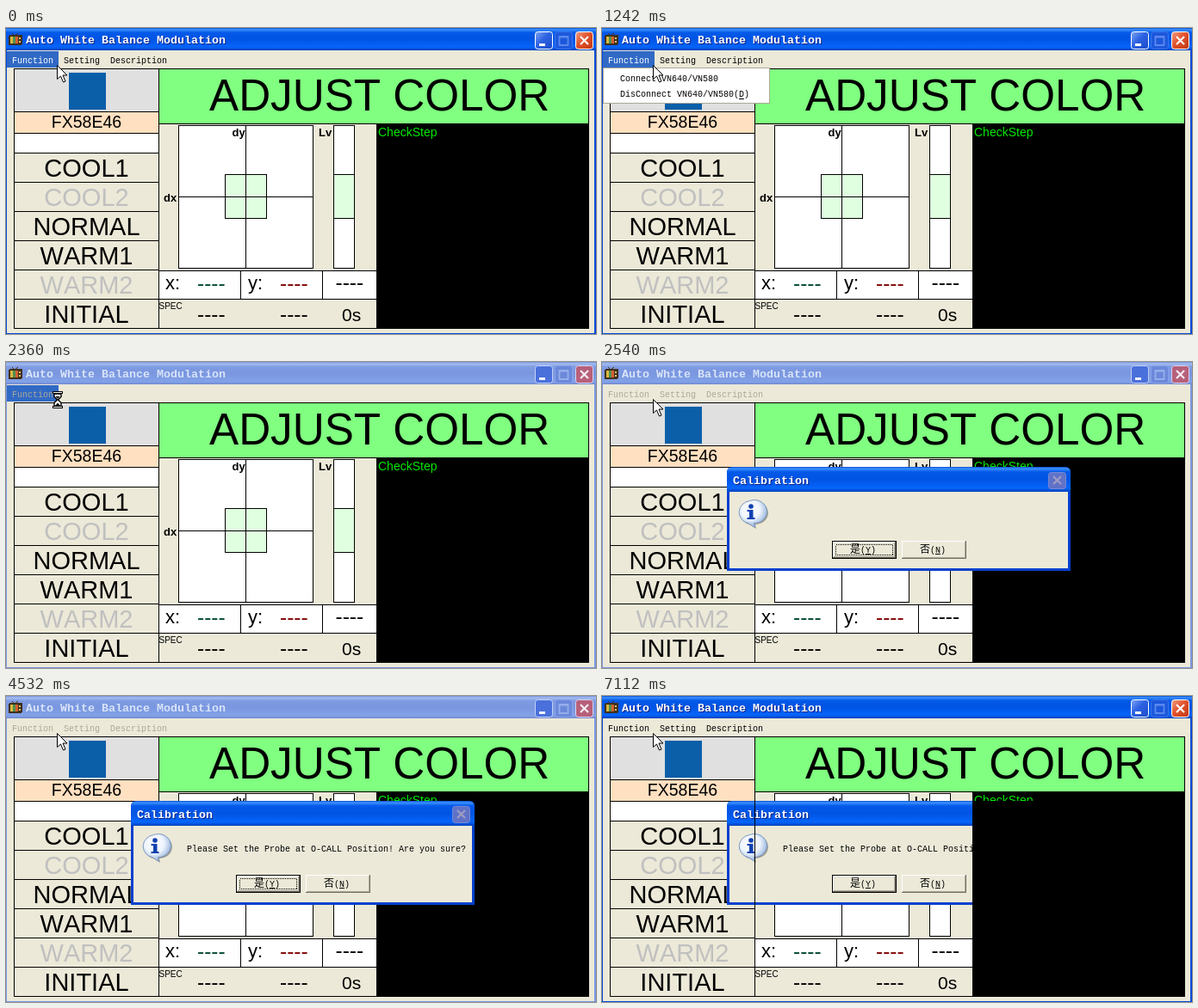
Recreate the animation shown at these times as an HTML page. Size 685 by 356 pixels, loop 8 s.

```html
<!DOCTYPE html>
<html lang="en">
<head>
<meta charset="utf-8">
<title>Auto White Balance Modulation</title>
<style>
html, body { margin: 0; width: 100%; height: 100%; overflow: hidden; background: #ece9d8; }
svg { display: block; width: 685px; height: 356px; font-kerning: none; }
rect, line { shape-rendering: crispEdges; }
.soft { shape-rendering: auto; }
text { white-space: pre; }
.ui { font: 10px "Liberation Mono", "Noto Sans CJK SC", "Noto Sans CJK", monospace; }
.cap { font: bold 13.33px "Liberation Mono", monospace; }
.sans { font-family: "Liberation Sans", Arial, sans-serif; }
</style>
</head>
<body>
<svg id="stage" viewBox="0 0 685 356" xmlns="http://www.w3.org/2000/svg">
  <defs>
    <linearGradient id="barOn" x2="0" y2="1">
      <stop offset="0" stop-color="#0a4fd0"/><stop offset=".07" stop-color="#3c92ff"/>
      <stop offset=".2" stop-color="#0559e8"/><stop offset=".5" stop-color="#0054e3"/>
      <stop offset=".85" stop-color="#0665fb"/><stop offset="1" stop-color="#0040bd"/>
    </linearGradient>
    <linearGradient id="barOff" x2="0" y2="1">
      <stop offset="0" stop-color="#7590da"/><stop offset=".08" stop-color="#a5bdf0"/>
      <stop offset=".22" stop-color="#7f9be2"/><stop offset=".5" stop-color="#7a96df"/>
      <stop offset=".88" stop-color="#82a2e8"/><stop offset="1" stop-color="#7288d0"/>
    </linearGradient>
    <linearGradient id="blueBtn" x2="1" y2="1">
      <stop offset="0" stop-color="#7fa6f5"/><stop offset=".45" stop-color="#2c62e2"/><stop offset="1" stop-color="#1c4cc8"/>
    </linearGradient>
    <linearGradient id="redBtn" x2="1" y2="1">
      <stop offset="0" stop-color="#f0a088"/><stop offset=".45" stop-color="#e2522c"/><stop offset="1" stop-color="#c03a12"/>
    </linearGradient>
    <radialGradient id="bubble" cx=".4" cy=".35" r=".7">
      <stop offset="0" stop-color="#fff"/><stop offset=".5" stop-color="#eef4fc"/><stop offset="1" stop-color="#86a8d8"/>
    </radialGradient>
  </defs>
  <g id="panel"></g>
  <g id="frame"></g>
  <g id="menubar"></g>
  <g id="dialog"></g>
  <g id="repaint"></g>
  <g id="drop"></g>
  <g id="arrow"></g>
  <g id="hourglass"></g>
</svg>
<script>
const $ = id => document.getElementById(id);
const LOOP = 8000;
const FACE = '#ece9d8', HILITE = '#316ac5', GREY = '#aca899';

const rect = (x, y, w, h, fill, extra = '') =>
  `<rect x="${x}" y="${y}" width="${w}" height="${h}" fill="${fill}" ${extra}/>`;
const box = (x, y, w, h, fill, stroke = '#000') =>
  rect(x + .5, y + .5, w, h, fill, `stroke="${stroke}"`);
const line = (x1, y1, x2, y2, stroke = '#000') =>
  `<line x1="${x1}" y1="${y1}" x2="${x2}" y2="${y2}" stroke="${stroke}"/>`;
const path = (d, extra) => `<path d="${d}" ${extra}/>`;
const text = (s, x, y, cls, fill = '#000', extra = '') =>
  `<text x="${x}" y="${y}" class="${cls}" fill="${fill}" ${extra}>${s}</text>`;
const sans = (s, x, y, size, fill = '#000', extra = '') =>
  text(s, x, y, 'sans', fill, `font-size="${size}" ${extra}`);
const mid = 'text-anchor="middle"';

function drawPanel() {
  let s = rect(0, 0, 685, 356, FACE);
  s += rect(10, 48, 167, 49, '#e0e0e0') + rect(73, 52, 43, 43, '#0b5fa8');
  s += rect(10, 98, 167, 24, '#ffe0c0') + rect(10, 123, 167, 22, '#fff');
  s += sans('FX58E46', 93.5, 116, 19.5, '#000', mid);
  const modes = ['COOL1', 'COOL2', 'NORMAL', 'WARM1', 'WARM2', 'INITIAL'];
  modes.forEach((m, i) => {
    s += sans(m, 93.5, 173 + 34 * i, 29, m.endsWith('2') ? '#c0c0c0' : '#000', mid);
  });
  [97, 122, 145, 179, 213, 247, 281, 315].forEach(y => s += line(10, y + .5, 177, y + .5));

  s += rect(178, 48, 498, 63, '#80ff80') + sans('ADJUST COLOR', 236, 96, 51.2);
  s += rect(430, 111, 246, 238, '#000') + line(178, 111.5, 676, 111.5);
  s += sans('CheckStep', 432, 126, 14, '#00e800');

  s += box(200, 113, 156, 166, '#fff') + box(254, 170, 48, 51, '#e0ffe0');
  s += line(278.5, 113, 278.5, 279) + line(200, 196.5, 356, 196.5);
  s += box(380, 113, 24, 166, '#fff') + box(380, 170, 24, 51, '#e0ffe0');
  [['dy', 262.5, 126], ['Lv', 363, 126], ['dx', 183, 202]].forEach(([t, x, y]) =>
    s += sans(t, x, y, 13, '#000', 'font-weight="bold"'));

  s += rect(178, 282, 252, 33, '#fff') + line(178, 282.5, 430, 282.5) + line(178, 315.5, 430, 315.5);
  s += line(272.5, 282, 272.5, 315) + line(367.5, 282, 367.5, 315);
  s += sans('x:', 185, 304, 22) + sans('y:', 281, 304, 22);
  [[222, 305, '#004830'], [318, 305, '#800000'], [382.5, 304, '#000'], [222, 341, '#000'], [318, 341, '#000']]
    .forEach(([x, y, c]) => s += sans('----', x, y, 24.5, c));
  s += sans('SPEC', 177.5, 327, 10) + sans('0s', 390, 341, 21);
  s += box(9, 47, 667, 302, 'none') + line(177.5, 47, 177.5, 349);
  return s;
}

// look of each title button: [fill, border, ink]
const buttonLook = {
  on: ['url(#blueBtn)', '#fff', '#fff'],
  off: ['#4a70dc', '#c4d2f6', '#f0f4ff'],
  closeOn: ['url(#redBtn)', '#fff', '#fff'],
  closeOff: ['#b8607a', '#d8d4f0', '#f4ecf4'],
  dimOn: ['#1c58dc', '#3c74ec', '#5a88ee'],
  dimOff: ['#6c88da', '#88a2e8', '#96aeec']
};

function capButton(x, y, kind, look) {
  const [fill, edge, ink] = buttonLook[look];
  const glyph = {
    min: rect(x + 5, y + 14, 7, 3, ink),
    max: path(`M${x + 5.5} ${y + 6}h10v10h-10z M${x + 5} ${y + 6.5}h11`, `fill="none" stroke="${ink}" stroke-width="1.8"`),
    close: path(`M${x + 6} ${y + 6}l9 9m0 -9l-9 9`, `stroke="${ink}" stroke-width="2.2"`)
  }[kind];
  return rect(x + .5, y + .5, 20, 20, fill, `rx="3" class="soft" stroke="${edge}"`) + glyph;
}

function drawFrame(on) {
  const edge = on ? '#0148d8' : '#7a96df';
  const state = on ? 'On' : 'Off';
  let s = rect(0, 0, 685, 26, `url(#bar${state})`);
  s += rect(0, 26, 1, 330, edge) + rect(683, 26, 2, 330, edge) + rect(0, 355, 685, 1, edge);
  // television icon
  s += path('M7 6l3 3l4 -3', 'fill="none" stroke="#403010"');
  s += rect(3, 8, 16, 12, '#40301c', 'rx="2"') + rect(5, 10, 9, 8, '#d86030');
  s += rect(5, 10, 3, 8, '#d8b840') + rect(8, 10, 3, 8, '#509050') + rect(15, 11, 2, 2, '#e0c870') + rect(15, 15, 2, 2, '#e0c870');
  const title = 'Auto White Balance Modulation';
  if (on) s += text(title, 24, 19, 'cap', '#0a1f83');
  s += text(title, 23, 18, 'cap', on ? '#fff' : '#d8e4f8');
  return s + capButton(614, 4, 'min', state.toLowerCase()) +
    capButton(637, 4, 'max', 'dim' + state) + capButton(661, 4, 'close', 'close' + state);
}

function drawMenubar(mode) {
  const held = mode === 'open' || mode === 'busy';
  const ink = mode === 'off' ? GREY : '#000';
  let s = rect(1, 26, 682, 20, FACE);
  if (held) s += rect(1, 27, 60, 19, HILITE);
  s += text('Function', 7, 41, 'ui', mode === 'open' ? '#fff' : mode === 'busy' ? GREY : ink);
  if (mode !== 'busy') s += text('Setting', 67, 41, 'ui', ink) + text('Description', 121, 41, 'ui', ink);
  return s;
}

function drawDrop(picked) {
  let s = box(1, 46, 193, 41, '#fff', GREY);
  if (picked) s += rect(4, 49, 188, 18, HILITE);
  s += text('Connect VN640/VN580', 21, 62, 'ui', picked ? '#fff' : '#000');
  s += text('DisConnect VN640/VN580(D)', 21, 80, 'ui');
  return s + line(159, 82.5, 165, 82.5);
}

function pushButton(x, label, key, main, focus) {
  const y = 208, w = 75, h = 21, d = main ? 1 : 0;
  let s = rect(x, y, w, h, main ? '#000' : FACE);
  s += rect(x + d, y + d, w - 2 * d, h - 2 * d, '#716f64');
  s += rect(x + d, y + d, w - 1 - 2 * d, h - 1 - 2 * d, '#fff');
  s += rect(x + d + 1, y + d + 1, w - 2 - 2 * d, h - 2 - 2 * d, GREY);
  s += rect(x + d + 1, y + d + 1, w - 3 - 2 * d, h - 3 - 2 * d, FACE);
  if (focus) s += rect(x + 4.5, y + 4.5, w - 9, h - 9, 'none', 'stroke="#000" stroke-dasharray="1 1"');
  s += text(label, x + 21, 222, 'ui', '#000', 'style="font-size:12px"') + text(`(${key})`, x + 33, 222, 'ui');
  return s + line(x + 39, 223.5, x + 45, 223.5);
}

function drawDialog(message, focus) {
  let s = path('M145 243V129q0 -7 7 -7H537q7 0 7 7V243z', 'fill="#0640cf"');
  s += path('M145 151V129q0 -7 7 -7H537q7 0 7 7V151z', 'fill="url(#barOn)"');
  s += rect(148, 151, 393, 89, FACE);
  s += text('Calibration', 153, 143, 'cap', '#0a1f83') + text('Calibration', 152, 142, 'cap', '#fff');
  s += rect(518.5, 128.5, 20, 19, '#6072c8', 'rx="3" class="soft" stroke="#7488d8"');
  s += path('M524 133l9 9m0 -9l-9 9', 'stroke="#a09cc4" stroke-width="2.2"');
  const bubble = 'M174.500 162.500a14.500 13.500 0 1 1 5 26l1 5l-7 -4.500a14.500 13.500 0 0 1 1 -26.500z';
  const icon = path(bubble, 'fill="#6c6a64" opacity=".6" transform="translate(1.500 1.500)"') +
    path(bubble, 'fill="url(#bubble)" stroke="#7c98c4"') +
    '<circle cx="176" cy="169" r="2.800" fill="#1040b0"/>' +
    path('M171.500 173h7v9h2v2h-9v-2h2.500v-7h-2.500z', 'fill="#1040b0"');
  s += `<g transform="translate(-3 -1)">${icon}</g>`;
  if (message) s += text('Please Set the Probe at O-CALL Position! Are you sure?', 210, 181, 'ui');
  return s + pushButton(267, '是', 'Y', true, focus) + pushButton(348, '否', 'N', false, false);
}

const drawArrow = () =>
  path('M59.500 43.500v16l4 -3.500l3 7l2.500 -1l-3 -7h5z', 'fill="#fff" stroke="#000"');

const drawHourglass = () =>
  path('M56 37v3.500l3.500 3.500l-3.500 3.500v4h8v-4l-3.500 -3.500l3.500 -3.500v-3.500z', 'fill="#fff" stroke="#000" stroke-width="1.400"') +
  box(54, 34, 11, 2, '#fff') + box(54, 51, 11, 2, '#fff') +
  path('M57.500 40h5l-2.500 3zM57 51l3 -3.500l3 3.500z', 'fill="#000"');

// what is on screen from each moment on
const scenes = [
  { at: 0, on: true, menu: 'open' },
  { at: 120, on: true, menu: 'open', drop: true },
  { at: 1990, on: true, menu: 'open', drop: true, picked: true },
  { at: 2360, on: false, menu: 'busy', busy: true },
  { at: 2540, on: false, menu: 'off', dialog: true, focus: true },
  { at: 2660, on: false, menu: 'off', dialog: true, focus: true, message: true },
  { at: 5780, on: true, menu: 'ready', dialog: true, message: true, repaint: true }
];

function show(s) {
  $('frame').innerHTML = drawFrame(s.on);
  $('menubar').innerHTML = drawMenubar(s.menu);
  $('drop').innerHTML = s.drop ? drawDrop(s.picked) : '';
  $('dialog').innerHTML = s.dialog ? drawDialog(s.message, s.focus) : '';
  $('repaint').innerHTML = s.repaint ? rect(430, 122, 115, 121, '#000') + line(177.5, 122, 177.5, 243) : '';
  $('arrow').innerHTML = s.busy ? '' : drawArrow();
  $('hourglass').innerHTML = s.busy ? drawHourglass() : '';
}

$('panel').innerHTML = drawPanel();
const start = performance.now();
let current;
function tick() {
  const t = (performance.now() - start) % LOOP;
  const scene = scenes.findLast(s => s.at <= t);
  if (scene !== current) show(current = scene);
  requestAnimationFrame(tick);
}
tick();
</script>
</body>
</html>
```
